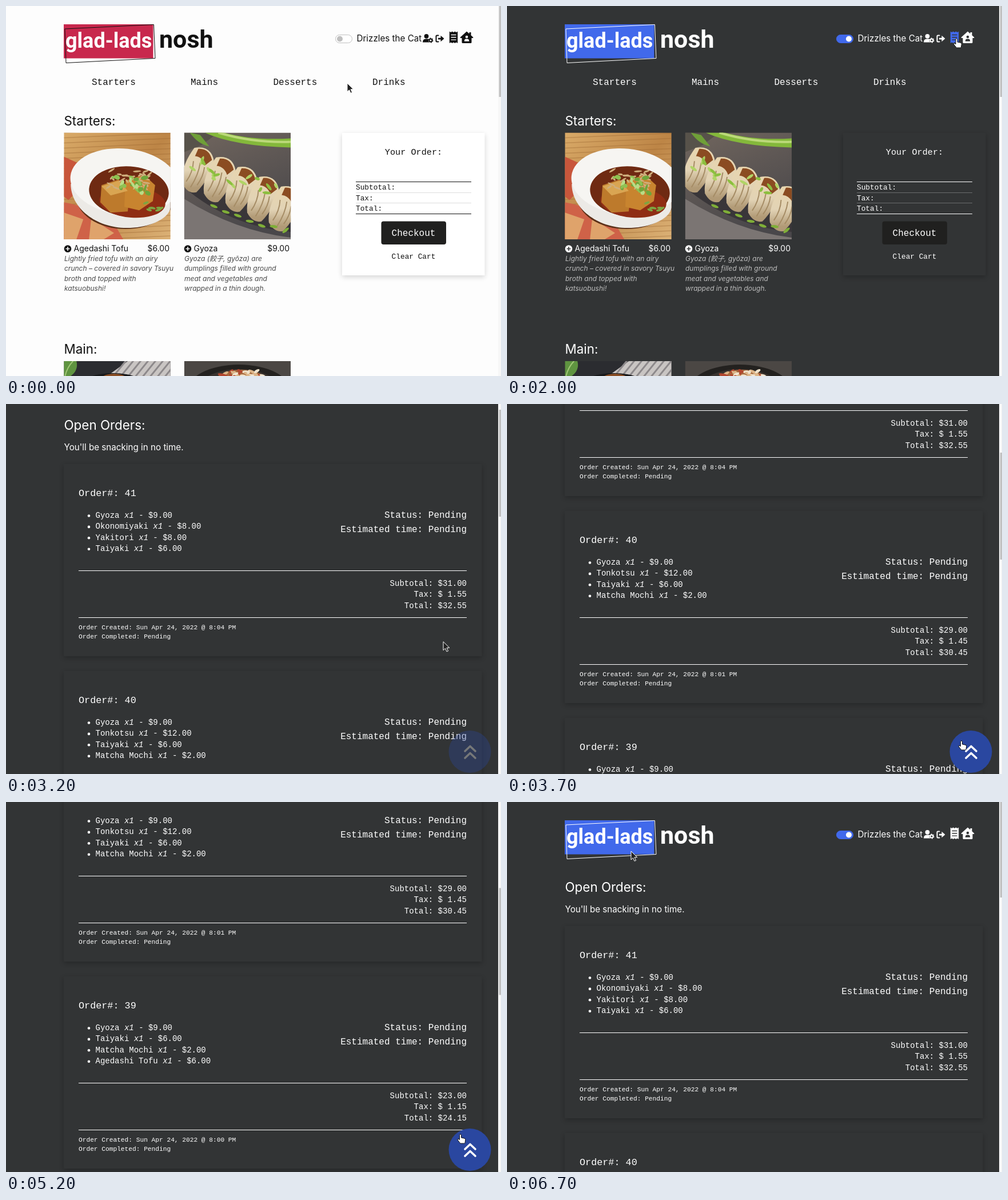
An HTML page that plays this animation: 866x647 px, repeating every 7000 ms.

```html
<!DOCTYPE html>
<html lang="en">
<head>
<meta charset="utf-8">
<title>Snack shop</title>
<style>
html, body { margin: 0; width: 100%; height: 100%; overflow: hidden; }
svg { display: block; }
#stage {
  --bg: #fdfdfd; --fg: #111; --accent: #c8284d; --soft: #4a4a4a; --rule: #ddd; --card: #fff; --shade: .16;
  background: var(--bg); fill: var(--fg); font-family: Inter, "Noto Sans CJK JP", "Noto Sans CJK", sans-serif;
}
#stage.dark {
  --bg: #323435; --fg: #fff; --accent: #4169eb; --soft: #bdbdbd; --rule: #6b6d6e; --card: #323435; --shade: .24;
}
.mono { font-family: "Liberation Mono", monospace; }
.logo { font-family: Roboto, sans-serif; font-weight: 700; }
.h { font-size: 22.4px; }
.desc { font-size: 12px; font-style: italic; fill: var(--soft); }
.bg { fill: var(--bg); }
.line { stroke: var(--fg); fill: none; }
.rule { stroke: var(--rule); }
.hot { fill: var(--accent); }
</style>
</head>
<body>
<svg id="stage" width="866" height="647" viewBox="0 0 866 647">
  <defs>
    <filter id="blur" x="-10%" y="-10%" width="120%" height="120%"><feGaussianBlur stdDeviation="5"/></filter>
    <linearGradient id="mat" x2="1" y2="1">
      <stop offset="0" stop-color="#d9aa68"/><stop offset=".5" stop-color="#bd8546"/><stop offset="1" stop-color="#dcb277"/>
    </linearGradient>
    <linearGradient id="slate" x2=".4" y2="1">
      <stop offset="0" stop-color="#71665e"/><stop offset="1" stop-color="#49474a"/>
    </linearGradient>
    <linearGradient id="dough" x2=".3" y2="1">
      <stop offset="0" stop-color="#e9d6ae"/><stop offset=".6" stop-color="#e2d3b5"/><stop offset="1" stop-color="#b19a76"/>
    </linearGradient>
  </defs>
  <g id="scroll">
    <g id="header"></g>
    <g id="menu"></g>
    <g id="empty"></g>
    <g id="orders"></g>
  </g>
  <g id="top">
    <circle id="disc" cx="811.5" cy="608" r="37"/>
    <path d="M803 607l9-8.500 9 8.500M803 619l9-8.500 9 8.500" fill="none" stroke="#fff" stroke-width="3.600" stroke-linecap="round" stroke-linejoin="round"/>
  </g>
  <rect x="861" width="5" height="647" fill="#f7f7f7"/>
  <rect id="thumb" x="862.5" width="3.500" fill="#c1c1c1"/>
  <path id="arrow" d="M0 0v15l3.500-3.300 2.500 5.600 2.600-1.100-2.500-5.500h4.700z" fill="#222" stroke="#fff"/>
  <path id="hand" d="M-1.500 9V1.500a1.500 1.500 0 0 1 3 0V6l5.500 1.200q2 .5 1.800 2.500l-.8 5.300q-.3 1-1.300 1H.800q-1 0-1.600-.8L-4.800 10q-.6-1.400.6-1.700 1.300-.3 2.700 1.500z" fill="#fff" stroke="#111"/>
</svg>
<script>
const $ = id => document.getElementById(id);
const put = (id, html) => { $(id).innerHTML = html; };
const text = (x, y, s, size, cls = '', more = '') =>
  `<text x="${x}" y="${y}" ${size ? `font-size="${size}"` : ''} class="${cls}" ${more}>${s}</text>`;
const mono = (x, y, s, size, anchor = 'start', more = '') =>
  text(x, y, s, size, 'mono', `text-anchor="${anchor}" ${more}`);
const rule = (x1, x2, y, cls = 'line') => `<path class="${cls}" d="M${x1} ${y}H${x2}"/>`;
const card = (x, y, w, h) =>
  `<rect x="${x}" y="${y + 3}" width="${w}" height="${h}" style="opacity:var(--shade)" fill="#000" filter="url(#blur)"/>
   <rect x="${x}" y="${y}" width="${w}" height="${h}" style="fill:var(--card)"/>`;
const photo = (x, y, body) =>
  `<svg x="${x}" y="${y}" width="186.500" height="186.500" viewBox="0 0 187 187">${body}</svg>`;
const times = (n, f) => Array.from({ length: n }, (_, i) => f(i)).join('');
const oval = (x, y, rx, ry, fill, turn = 0) =>
  `<ellipse cx="${x}" cy="${y}" rx="${rx}" ry="${ry}" fill="${fill}" transform="rotate(${turn} ${x} ${y})"/>`;
let seed = 7;
const rnd = (a, b) => a + (b - a) * ((seed = seed * 16807 % 2147483647) / 2147483647);

// flat food pictures
const tofu = () => `<rect width="187" height="187" fill="url(#mat)"/>
  ${times(22, i => `<path d="M0 ${i * 9}L187 ${i * 9 - 8}" stroke="#9a6431" stroke-opacity=".4" stroke-width="1.500"/>`)}
  <path d="M0 42L26 54 18 78 34 92 8 118 0 112z" fill="#c8563b"/>
  <path d="M0 122Q50 130 92 166L104 187H0z" fill="#cf6248"/>
  <path d="M0 140L34 152 22 187H0zM48 150L88 176 70 187H44z" fill="#dfa36b"/>
  ${oval(108, 112, 86, 57, '#5b3118')}
  <path d="M12 90C12 132 56 167 110 167 158 167 187 146 187 130V60z" fill="#eceae6"/>
  ${oval(106, 86, 95, 58, '#f6f5f2', 6)}
  ${oval(114, 103, 70, 44, '#6f2a12', 4)}
  ${oval(120, 122, 58, 27, '#8f2d14', 4)}
  <path d="M66 92L96 82 116 100 112 138 82 140 64 122z" fill="#bd7a2c"/>
  <path d="M108 84L140 74 160 92 156 120 132 136 106 130z" fill="#c8842f"/>
  <path d="M66 94L96 84 112 102 82 110z" fill="#d9a552"/>
  ${times(34, () => oval(rnd(78, 150), rnd(66, 98), rnd(3, 9), 1.6, '#cfae7c', rnd(-60, 60)))}
  ${times(22, () => oval(rnd(88, 148), rnd(78, 106), rnd(3, 7), rnd(2, 4), ['#8fc152', '#b9dc86', '#6fa53a'][rnd(0, 3) | 0], rnd(0, 180)))}
  ${times(7, () => oval(rnd(128, 172), rnd(122, 136), 5, 2, '#7da542', rnd(-40, 20)))}`;

const gyoza = () => `<rect width="187" height="187" fill="url(#slate)"/>
  <path d="M0 0H60L30 22 0 34z" fill="#57524a"/>
  <path d="M0 116Q90 172 187 184V187H0z" fill="#7b7573"/>
  <path d="M0 96Q80 164 187 174V150L0 60z" fill="#393639"/>
  <path d="M36 0Q90 24 187 26V10Q120 14 70 0z" fill="#84b83b"/>
  <path d="M60 0Q120 18 187 16" fill="none" stroke="#bcd97a" stroke-width="4"/>
  <path d="M10 0Q24 20 44 24L28 4z" fill="#6f9f38"/>
  ${times(5, i => {
    const x = 24 + i * 38, y = 62 + i * 17;
    return `<g transform="translate(${x} ${y}) rotate(24)">
      <path d="M-20-30Q4-46 20-24 27 8 15 40 2 49-14 36-29 10-20-30z" fill="url(#dough)"/>
      <path d="M-13-31Q4-40 17-23L10-10Q0-21-13-17z" fill="#8b4c22"/>
      <path d="M-12-8Q-5 10-9 30M0-10Q6 10 2 36M10-6Q15 10 11 28" fill="none" stroke="#a58c65" stroke-width="2"/></g>`;
  })}
  ${times(18, i => { const x = rnd(12, 178); return oval(x, 45 + x * .38 + rnd(-20, 20), rnd(4, 9), 2.5, i % 2 ? '#8cbf3f' : '#b0d466', rnd(-70, 70)); })}
  ${times(7, i => oval(52 + i * 21, 132 + i * 7 + rnd(-4, 4), 7, 2.5, '#7fae38', rnd(-50, 30)))}`;

const cutlet = () => `<rect width="187" height="187" fill="#2b2c30"/>
  <path d="M76 26L112 0H187V40H90z" fill="#c9c5c3"/>
  ${times(10, i => `<path d="M${84 + i * 13} 30l26-32" stroke="#8d898b" stroke-width="3"/>`)}
  <path d="M0 0H22Q26 16 12 26H0z" fill="#5f9440"/><path d="M2 26Q6 10 16 0" stroke="#a2c877" fill="none" stroke-width="2"/>
  ${oval(86, 48, 62, 27, '#17181a')}${oval(88, 44, 32, 22, '#8a4e25')}`;

const pancake = () => `<rect width="187" height="187" fill="#4b4744"/>
  ${oval(96, 54, 92, 48, '#23211f')}${oval(96, 60, 80, 46, '#39332f')}${oval(100, 42, 50, 27, '#a7693d')}
  ${times(26, i => oval(rnd(66, 140), rnd(17, 30), rnd(4, 10), 2.5, ['#f0e3cd', '#b2452e', '#dcb487'][i % 3], rnd(-50, 50)))}`;

const item = (x, name, price, lines) => `<circle cx="${x + 6.5}" cy="424.500" r="6.300"/>
  <path d="M${x + 3} 424.500h7m-3.500-3.500v7" style="stroke:var(--bg)" stroke-width="1.600"/>
  ${text(x + 17, 429, name, 14)}${text(x + 184.5, 429, price, 14, '', 'text-anchor="end"')}
  ${lines.map((s, i) => text(x + .5, 446 + i * 17.3, s, 0, 'desc')).join('')}`;

put('header', `<rect class="hot" x="101" y="32" width="156.500" height="59.500"/>
  ${text(104, 73, 'glad-lads', 36, 'logo', 'fill="#fff"')}
  ${text(268, 73, 'nosh', 43, 'logo')}
  <path class="line" d="M103 40L258.500 32.500 261 91.500 105 99.500z"/>
  <rect id="ring" x="574" y="48" width="34" height="18" rx="9" fill="#4169eb" opacity=".4"/>
  <rect id="track" x="576.500" y="50.500" width="29" height="14" rx="7"/>
  <circle id="knob" cy="57.500" r="5"/>
  ${text(613.5, 62, 'Drizzles the Cat', 15.2)}
  <circle cx="735.500" cy="52.800" r="3.900"/>
  <path d="M729 63.500q0-6 5.500-6h2.500q2 0 3 1-2 2.500 0 5z"/>
  <circle cx="743" cy="60" r="2.500" fill="none" style="stroke:var(--fg)" stroke-width="2"/>
  <circle cx="743" cy="60" r="3.900" fill="none" style="stroke:var(--fg)" stroke-width="1.200" stroke-dasharray="2 2.080"/>
  <path class="line" stroke-width="2" stroke-linecap="round" d="M756.500 51.500h-2.500q-1.500 0-1.500 1.500v8q0 1.500 1.500 1.500h2.500"/>
  <path d="M756 55.800h4.500v-4l6 5.200-6 5.200v-3.700H756z"/>
  <g id="receipt"><path d="M775.800 44.500l2.400 1.600 2.400-1.600 2.400 1.600 2.400-1.600 2.400 1.600 2.400-1.600v20.500l-2.400-1.600-2.400 1.600-2.400-1.600-2.400 1.600-2.400-1.600-2.400 1.600z"/>
    <path d="M778.500 50.500h9m-9 4.300h9m-9 4.300h9" style="stroke:var(--bg)" stroke-width="1.400"/></g>
  <g id="house"><path d="M806 44.500l4.500 4v-2.500h3v5.200l3.800 3.600q.5 1.200-.8 1.200h-2v7.500q0 1.500-1.500 1.500h-14q-1.500 0-1.500-1.500V56h-2q-1.300 0-.8-1.200z"/>
    <circle class="bg" cx="806" cy="54" r="2.300"/><path class="bg" d="M801.800 61.800q0-4.300 3.200-4.300h2q3.200 0 3.200 4.300z"/></g>`);

put('menu', [['Starters', 150], ['Mains', 323], ['Desserts', 467.5], ['Drinks', 641]].map(([s, x]) => mono(x, 137.5, s, 16)).join('')
  + text(101.5, 209, 'Starters:', 0, 'h') + text(101.5, 608, 'Main:', 0, 'h')
  + photo(101.3, 221.5, tofu()) + photo(311.7, 221.5, gyoza()) + photo(101.3, 621, cutlet()) + photo(311.7, 621, pancake())
  + item(101.5, 'Agedashi Tofu', '$6.00', ['Lightly fried tofu with an airy', 'crunch – covered in savory Tsuyu', 'broth and topped with', 'katsuobushi!'])
  + item(311.5, 'Gyoza', '$9.00', ['Gyoza (餃子, gyōza) are', 'dumplings filled with ground', 'meat and vegetables and', 'wrapped in a thin dough.'])
  + card(588, 222, 249.5, 249)
  + mono(713, 260, 'Your Order:', 15.2, 'middle')
  + rule(612, 814, 307.5) + rule(612, 814, 326.5, 'rule') + rule(612, 814, 344.5, 'rule') + rule(612, 814, 363.5)
  + ['Subtotal:', 'Tax:', 'Total:'].map((s, i) => mono(612, 321 + i * 18.5, s, 12.8)).join('')
  + '<rect x="656.500" y="376.500" width="113.500" height="40.500" rx="4" fill="#20201f"/>'
  + mono(713, 402, 'Checkout', 16, 'middle', 'fill="#fff"') + mono(713, 442, 'Clear Cart', 12.8, 'middle'));

const open = text(101.5, 157, 'Open Orders:', 0, 'h') + text(101.5, 193, "You'll be snacking in no time.", 15.2);
put('empty', open + text(101.5, 269, 'Closed Orders:', 0, 'h') + rule(101, 832, 303.5) + '<circle cx="466.500" cy="342.500" r="11"/>');

const order = (no, goods, sums, clock, i) => `<g transform="translate(0 ${i * 362})">${card(101, 217, 731.5, 336)}
  ${mono(127, 273, 'Order#: ' + no, 16.8)}
  ${goods.map(([name, cost], k) => `<circle cx="145" cy="${307.5 + k * 19.4}" r="2.300"/>`
    + mono(156.5, 311 + k * 19.4, `${name} <tspan font-style="italic">x1</tspan> - $${cost}.00`, 14)).join('')}
  ${mono(806, 311, 'Status: Pending', 16, 'end')}${mono(806, 336, 'Estimated time: Pending', 16, 'end')}
  ${rule(127, 806, 403.5)}${rule(127, 806, 485.5)}
  ${['Subtotal: $', 'Tax: $ ', 'Total: $'].map((s, k) => mono(806, 430 + k * 19.4, s + sums[k], 14, 'end')).join('')}
  ${mono(127, 506, `Order Created: Sun Apr 24, 2022 @ ${clock} PM`, 11.2)}${mono(127, 522, 'Order Completed: Pending', 11.2)}</g>`;
const G = ['Gyoza', 9], T = ['Taiyaki', 6], M = ['Matcha Mochi', 2];
put('orders', open + [
  [41, [G, ['Okonomiyaki', 8], ['Yakitori', 8], T], ['31.00', '1.55', '32.55'], '8:04'],
  [40, [G, ['Tonkotsu', 12], T, M], ['29.00', '1.45', '30.45'], '8:01'],
  [39, [G, T, M, ['Agedashi Tofu', 6]], ['23.00', '1.15', '24.15'], '8:00'],
  [38, [G], ['9.00', '0.45', '9.45'], '7:58']
].map((o, i) => order(...o, i)).join(''));

// [time, value...] keys, linear between
const track = (keys, t) => {
  const i = Math.max(1, keys.findIndex(k => k[0] > t)), a = keys[i - 1], b = keys[i];
  const p = Math.min(1, (t - a[0]) / (b[0] - a[0]));
  return a.slice(1).map((v, k) => v + (b[k + 1] - v) * p);
};
const between = (t, a, b) => t >= a && t < b;
const path = [[0, 597, 135], [200, 597, 135], [400, 597, 93], [500, 597, 93], [900, 593, 59], [1300, 593, 59],
  [1700, 804, 57], [1800, 787, 58], [1900, 787, 58], [2100, 786, 56], [2600, 786, 56], [2900, 745, 300], [3000, 745, 300],
  [3500, 795, 589], [4200, 795, 589], [4400, 795, 581], [5900, 795, 581], [6000, 793, 581], [6100, 793, 581],
  [6400, 546, 313], [6600, 546, 313], [6700, 217, 86], [7001, 217, 86]];
const wheel = [[0, 0], [3000, 0], [3700, 392], [4100, 710], [7001, 710]];
const fade = [[0, 0], [3100, 0], [3400, 1], [5600, 1], [5700, .95], [5900, 0], [7001, 0]];
const slide = [[0, 585], [1000, 585], [1200, 598], [2400, 598], [2500, 585], [2600, 585], [2700, 598], [7001, 598]];

const scrollAt = t => {
  const p = Math.min(1, Math.max(0, (t - 5100) / 500));
  return Math.round(track(wheel, t)[0] * (1 - p * p * (3 - 2 * p)));
};
const show = (id, on) => { $(id).style.display = on ? '' : 'none'; };
const move = (id, x, y) => $(id).setAttribute('transform', `translate(${x} ${y})`);
const set = (id, attrs) => { for (const k in attrs) $(id).setAttribute(k, attrs[k]); };

function draw(ms) {
  const t = Math.floor((ms % 7000 + 5) / 100) * 100 % 7000; // the screen refreshes ten times a second
  const dark = t >= 1000, y = scrollAt(t);
  $('stage').classList.toggle('dark', dark);
  show('menu', t < 2500);
  show('empty', between(t, 2500, 2700));
  show('orders', t >= 2700);
  move('scroll', 0, -y);

  show('ring', between(t, 1000, 2000));
  set('track', { fill: dark ? '#4169eb' : '#fff', stroke: dark ? '#4169eb' : '#bfbfbf' });
  set('knob', { cx: dark ? track(slide, t)[0] : 584, fill: dark ? '#fff' : '#bfbfbf' });
  $('receipt').classList.toggle('hot', between(t, 1800, 2700));
  $('house').classList.toggle('hot', t === 1700);

  const long = t < 2500 ? 179 : t < 2700 ? 611 : 187;
  set('thumb', { y: y * .268 - 20, height: long });
  set('top', { opacity: track(fade, t)[0] });
  set('disc', { fill: t === 4300 ? '#3050b4' : '#2a47a0' });

  const [cx, cy] = track(path, t), hand = between(t, 1700, 2700) || between(t, 3500, 6000);
  show('hand', hand);
  show('arrow', !hand);
  move(hand ? 'hand' : 'arrow', cx, cy);
}
const start = performance.now();
const tick = () => { draw(performance.now() - start); requestAnimationFrame(tick); };
draw(0);
requestAnimationFrame(tick);
</script>
</body>
</html>
```
